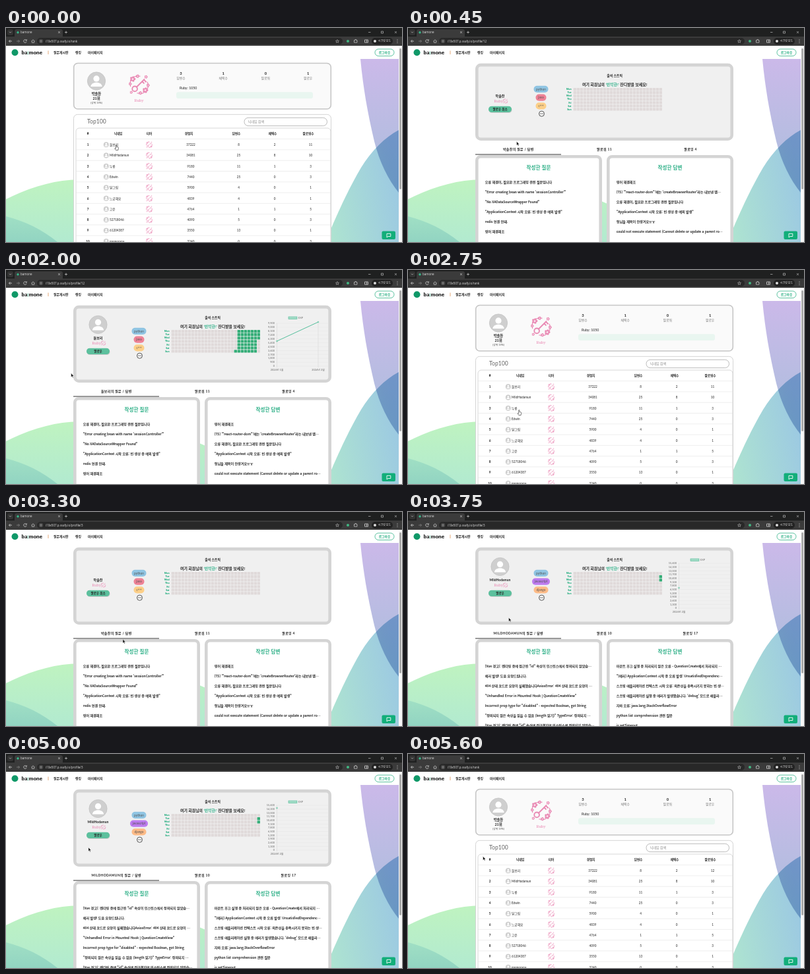
An HTML page that plays this animation: 600 by 325 pixels, repeating every 5.65 s.

```html
<!DOCTYPE html>
<html lang="ko">
<head>
<meta charset="utf-8">
<style>
html, body { margin: 0; width: 100%; height: 100%; overflow: hidden; background: #fff; }
svg { display: block; width: 100vw; height: 100vh; }
text { font-family: Lato, "Noto Sans CJK KR", "Noto Sans CJK", sans-serif; white-space: pre; }
.list text { font-family: "Noto Sans CJK KR", "Noto Sans CJK", sans-serif; }
.chrome text { font-family: "Open Sans", "Noto Sans CJK KR", "Noto Sans CJK", sans-serif; }
.serif { font-family: "Noto Serif", serif; }
text[font-weight="500"] { stroke: #222; stroke-width: .16; }
</style>
</head>
<body>
<svg id="stage" viewBox="0 0 600 325" xmlns="http://www.w3.org/2000/svg"></svg>
<script>
const LOOP = 5650;
const GREEN = '#16a878', PINK = '#e98ab4', INK = '#222';

const text = (x, y, s, size, { fill = INK, w = 400, a = 'middle', more = '' } = {}) =>
  `<text x="${x}" y="${y}" font-size="${size}" fill="${fill}" font-weight="${w}" text-anchor="${a}" ${more}>${s}</text>`;
const rect = (x, y, w, h, fill, r = 0, more = '') =>
  `<rect x="${x}" y="${y}" width="${w}" height="${h}" rx="${r}" fill="${fill}" ${more}/>`;
const circle = (x, y, r, fill, more = '') => `<circle cx="${x}" cy="${y}" r="${r}" fill="${fill}" ${more}/>`;
const line = (d, stroke, w = 1, more = '') => `<path d="${d}" fill="none" stroke="${stroke}" stroke-width="${w}" ${more}/>`;
const range = n => [...Array(n).keys()];
const badge = (x, y, size) => `<use href="#badge" x="${x - size / 2}" y="${y - size / 2}" width="${size}" height="${size}"/>`;
const avatar = (x, y, r) => `<g transform="translate(${x} ${y}) scale(${r / 14})">
  ${circle(0, 0, 13.6, '#cfcfcf', 'stroke="#c2c2c2" stroke-width=".8"')}
  ${circle(0, -3.6, 4.6, '#fff')}<path d="M-8.6 8.6C-8.6 0 8.6 0 8.6 8.6Z" fill="#fff"/></g>`;

function defs() {
  const flower = (x, y, r) => range(5).map(i => {
    const a = i * Math.PI * 0.4;
    return circle((x + r * Math.cos(a)).toFixed(1), (y + r * Math.sin(a)).toFixed(1), r * 0.66, PINK);
  }).join('') + circle(x, y, r * 0.5, '#fbe3ee');
  const grad = (id, from, to, dir) => `<linearGradient id="${id}" ${dir}>
    <stop stop-color="${from}"/><stop offset="1" stop-color="${to}"/></linearGradient>`;
  const down = 'x1="0" y1="0" x2="0" y2="1"';
  return `<defs>
    ${grad('leaf', '#bff3c0', '#b2ead0', down)}
    ${grad('sea', '#a0dfc4', '#92d4c2', down)}
    ${grad('violet', '#cbb9e9', '#a9bfdc', down)}
    ${grad('lagoon', '#aee4d0', '#9cc9e2', 'x1="0" y1=".8" x2="1" y2=".5"')}
    <symbol id="badge" viewBox="0 0 32 32">
      ${line('M4 19C1 9 9 2 18 4M28 12C32 23 23 31 13 28', PINK, 1.1)}
      ${line('M12 20L24 8M20.5 11.5L23.5 14.5M23 9L26.5 12.5', PINK, 1.8)}
      ${circle(10, 22, 3.6, 'none', `stroke="${PINK}" stroke-width="1.8"`)}
      ${flower(7, 8, 2.5)}${flower(25, 24, 2.5)}${flower(14, 4, 1.6)}${flower(18, 28, 1.6)}
      ${flower(3.5, 15, 1.4)}${flower(29, 17, 1.5)}${flower(26, 5, 1.5)}${flower(5, 27, 1.3)}
    </symbol></defs>`;
}

function browser() {
  const gray = '#d2d2d2';
  return `<g class="chrome">
    ${rect(0, 0, 600, 27, '#1f2020')}${rect(0, 13, 600, 14, '#3b3b3b')}
    ${rect(2, 2, 9, 9, '#333', 2.5)}${line('M5 5.7L6.5 7.2L8 5.7', gray, .7)}
    ${rect(13, 2, 73, 14, '#3b3b3b', 3)}${circle(18, 6.7, 1.7, '#35b88a')}
    ${text(22, 8.4, 'bamone', 4.5, { fill: '#e4e4e4', a: 'start' })}
    ${line('M79 5L82 8M82 5L79 8M89 6.5H93M91 4.5V8.5', gray, .7)}
    ${line('M549 6.5H552.5M568.5 5H571.5V8H568.5ZM589 5L592 8M592 5L589 8', gray, .6)}
    ${line('M9 20H4.5M6.5 18L4.5 20L6.5 22', gray, .8)}
    ${line('M16 20H20.5M18.5 18L20.5 20L18.5 22', '#858585', .8)}
    ${line('M31 18.8A2.3 2.3 0 1 0 31.2 20.6M31.3 17.3V19H29.5', gray, .8)}
    ${line('M38.5 20L41 17.8L43.5 20M39.3 19.5V22.2H42.7V19.5', gray, .7)}
    ${rect(47, 15, 463, 10, '#282828', 5)}${circle(53, 20, 3.4, '#3d3d3d')}
    ${line('M51.2 19H54.8M51.2 21H54.8', gray, .6)}
    ${text(60, 21.5, '', 4.5, { fill: '#e2e2e2', a: 'start', more: 'id="url"' })}
    ${line('M502 17.6L502.7 19.3L504.5 19.4L503.1 20.6L503.6 22.3L502 21.4L500.4 22.3L500.9 20.6L499.5 19.4L501.3 19.3Z', gray, .5)}
    ${circle(518, 20, 2, '#41b883')}
    ${line('M527.5 18.5H529V17.5H530.5V18.5H532V22H527.5Z', gray, .7)}
    ${line('M543.5 18H548.5V22H543.5ZM546.5 18V22', gray, .8)}
    ${rect(554, 15, 32, 10, '#222', 5)}${circle(559, 20, 2, '#ddd')}
    ${text(573.5, 21.4, '시크릿 모드', 4, { fill: '#eee' })}
    ${[17.8, 20, 22.2].map(y => circle(593, y, .55, gray)).join('')}
  </g>`;
}

function backdrop() {
  return rect(0, 27, 600, 298, '#fff') + `
    <path d="M0 260C40 240 75 231 110 230C190 229 255 246 300 266C350 288 390 310 420 325H0Z" fill="url(#leaf)"/>
    <path d="M0 286C28 293 55 306 78 325H0Z" fill="url(#sea)"/>
    <path d="M537 47H595V250C579 230 566 204 558 172C548 130 541 90 537 47Z" fill="url(#violet)"/>
    <path d="M484 325C500 286 518 246 538 212C554 186 574 166 595 155V325Z" fill="url(#lagoon)" style="mix-blend-mode:multiply"/>`;
}

function siteHeader() {
  const nav = (x, s) => text(x, 39, s, 4.9, { w: 700, a: 'start' });
  return rect(0, 27, 595, 20, '#fff') + circle(13.5, 37.3, 5, '#109868')
    + text(23.5, 40.2, `ba<tspan fill="${GREEN}">:</tspan>mone`, 8.1, { w: 900, a: 'start' })
    + line('M64 34.5V40', '#e2a06a', .9)
    + nav(72, '질문게시판') + nav(105, '랭킹') + nav(124, '마이페이지')
    + rect(559, 32, 29, 10.5, '#fff', 5.2, `stroke="${GREEN}" stroke-width=".7"`)
    + text(573.5, 39, '로그아웃', 4.8, { fill: GREEN, w: 700 });
}

function overlay() {
  return rect(595, 27, 5, 298, '#f7f7f7') + rect(596.2, 31, 2.8, 214, '#a5a5a5', 1.4)
    + rect(569.5, 308.5, 20.5, 12.5, '#12ae7a', 2)
    + line('M577 312.3H582.8V316.5H579L577 318Z', '#fff', .9);
}

const ranking = [
  ['들보리', 37222, 8, 2, 11], ['MildHodamun', 34081, 25, 8, 10], ['누룽', 9180, 11, 1, 3],
  ['Edwin', 7440, 25, 0, 3], ['달그림', 5900, 4, 0, 1], ['느긋해요', 4839, 4, 0, 1],
  ['고운', 4764, 1, 1, 5], ['52718046', 4090, 5, 0, 3], ['61204387', 3550, 13, 0, 1], ['momoruna', 3240, 0, 0, 3],
];

function rankPage() {
  const stats = [['답변수', 3], ['채택수', 1], ['팔로워', 0], ['팔로우', 1]].map(([label, n], i) => {
    const x = 265 + i * 64.2;
    return text(x, 71, n, 5.8, { w: 700 }) + text(x, 78, label, 4.8, { fill: '#777' });
  }).join('');
  const heads = [[124, '#'], [170, '닉네임'], [217, '티어'], [277, '경험치'], [349, '답변수'], [404, '채택수'], [458, '팔로워수']]
    .map(([x, s]) => text(x, 162, s, 4.6, { w: 500 })).join('');
  const rows = ranking.map(([name, exp, answers, picks, fans], i) => {
    const y = 177.2 + i * 16.3, cell = (x, s, more) => text(x, y + 1.8, s, 4.7, { more });
    return line(`M106 ${y - 8.6}H492`, '#e2e2e2', .6) + text(124, y + 1.8, i + 1, 4.7, { w: 700 })
      + avatar(151.8, y, 4) + text(157, y + 1.8, name, 4.7, { a: 'start' }) + badge(217, y, 11)
      + cell(280, exp) + cell(352.5, answers) + cell(407, picks) + cell(461.5, fans, i ? '' : 'id="topFans"');
  }).join('');
  return `<g id="rank">
    ${rect(102.7, 53.5, 389.6, 69.5, '#fafafa', 6, 'stroke="#c6c6c6" stroke-width="1.6"')}
    ${avatar(137, 80.5, 14)}${text(137, 102.2, '박솔찬', 5.2, { w: 700 })}
    ${text(137, 109.2, '21위', 5.4, { w: 700 })}${text(137, 115, '(상위 19%)', 3.8, { fill: '#444' })}
    ${badge(201.5, 86, 34)}${text(201.5, 112, 'Ruby', 5.8, { fill: PINK, more: 'class="serif"' })}
    ${stats}${text(263, 93, 'Ruby: 1050', 5.2, { a: 'start' })}${rect(258, 97.3, 207, 9.7, '#e9f6f0', 3)}
    ${rect(102.5, 131.3, 390, 210, '#fff', 6, 'stroke="#d4d4d4" stroke-width="1"')}
    ${text(123, 145.3, 'Top100', 8.6, { fill: '#666', a: 'start' })}
    ${rect(361, 136.3, 125.5, 12.3, '#fff', 6, 'stroke="#aaa" stroke-width=".8"')}
    ${text(366.5, 144, '닉네임 검색', 5.1, { fill: '#888', a: 'start' })}
    ${rect(106, 152, 386, 190, '#fff', 5, 'stroke="#d4d4d4" stroke-width=".9"')}
    ${heads}${rows}</g>`;
}

const bug = '"ApplicationContext 시작 오류: 빈 생성 중 예외 발생"';
const ask = '오류 해결이, 필요한 프로그래밍 관련 질문입니다';
const bean = {
  name: '들보리', fans: 11, follows: 4, button: '팔로우', loaded: true,
  tags: [['python', '#8fc4e2', 22], ['java', '#ee8296', 16], ['c++', '#fccf88', 16]],
  grass: (c, r) => r < 3 ? c > 19 : r < 6 ? c > 19 && c < 26 : c > 18 && c < 26,
  step: 900, ticks: 11, top: 81, points: [108, 79],
  questions: [ask, `"Error creating bean with name 'sessionController'"`, '"No XADataSourceWrapper Found"', bug, 'redis 연결 안돼.', '영어 해결해조'],
  answers: ['영어 해결해조', `[TS] '"react-router-dom"'에는 'createBrowserRouter'라는 내보낸 멤…`, ask, bug, '형님들 제목이 안생겨요ㅠㅠ', 'could not execute statement [Cannot delete or update a parent ro…'],
};
const blank = { ...bean, name: '박솔찬', button: '팔로우 취소', loaded: false, grass: () => false };
const second = {
  name: 'MildHodamun', fans: 10, follows: 17, button: '팔로우', loaded: true,
  tags: [['python', '#8fc4e2', 22], ['javascript', '#bd7bef', 27], ['django', '#fdbb87', 22]],
  grass: (c, r) => c === 26 && (r === 1 || r === 2),
  step: 1300, ticks: 12, top: 78, points: [82],
  questions: ['[Vue 경고]: 렌더링 중에 접근된 "id" 속성이 인스턴스에서 정의되지 않았습…', '에러 발생! 도움 요청드립니다.',
    '404 상태 코드로 요청이 실패했습니다AxiosError: 404 상태 코드로 요청이 …', '"Unhandled Error in Mounted Hook | QuestionCreateView"',
    'Incorrect prop type for "disabled" - expected Boolean, got String', `"정의되지 않은 속성을 읽을 수 없음 (length 읽기)" TypeError: 정의되지 …`,
    '[Vue 경고]: 렌더링 중에 "id" 속성에 접근했지만 인스턴스에 정의되지 않았습…'],
  answers: ['마운트 후크 실행 중 처리되지 않은 오류 - QuestionCreate에서 처리되지 …', `"[에러] ApplicationContext 시작 중 오류 발생: UnsatisfiedDependenc…`,
    '스프링 애플리케이션 컨텍스트 시작 오류: 의존성을 충족시키지 못하는 빈 생…', `스프링 애플리케이션 실행 중 에러가 발생했습니다. 'debug' 모드로 애플리…`,
    '자바 오류: java.lang.StackOverflowError', 'python list comprehension 관련 질문', 'js setTimeout'],
};

function chart(user) {
  const gap = (146 - user.top) / user.ticks, xs = [410.5, 473];
  const ticks = range(user.ticks + 1).map(i => {
    const y = 146 - i * gap;
    return line(`M409 ${y}H488`, '#e0e0e0', .4)
      + text(407, y + 1.3, (i * user.step).toLocaleString('en-US'), 3.9, { fill: '#666', a: 'end' });
  }).join('');
  const labels = user.points.length > 1 ? ['2024년 1월', '2024년 2월'] : ['2024년 2월'];
  return rect(428, 71, 13, 3.6, '#a5ddc8', 0, 'stroke="#4fba96" stroke-width=".6"')
    + text(443, 74.3, 'EXP', 3.9, { fill: '#666', a: 'start' })
    + ticks + labels.map((s, i) => line(`M${xs[i]} ${user.top}V148`, '#d4d4d4', .5)
      + text(xs[i], 153.3, s, 3.9, { fill: '#666' })).join('') + '<g class="curve"></g>';
}

function profilePage(user, id) {
  const days = ['Mon', 'Tue', 'Wed', 'Thu', 'Fri', 'Sat', 'Sun'];
  const cells = days.map((d, r) => text(247.5, 94.3 + r * 5.05, d, 3.7, { fill: GREEN, w: 900, a: 'end' })
    + range(27).map(c => rect(250.6 + c * 5, 91.1 + r * 5.02, 4.4, 4.4, user.grass(c, r) ? '#35ad78' : '#e0dada', .5)).join('')).join('');
  const tags = user.tags.map(([s, fill, w], i) => rect(201.5 - w / 2, 87.8 + i * 12.7, w, 10.2, fill, 5)
    + text(201.5, 94.5 + i * 12.7, s, 4.8, { fill: '#555' })).join('');
  const tab = (x, s) => text(x, 186.3, s, 4.9, { w: 700, more: 'letter-spacing=".4"' });
  const panel = (x, title, items) => rect(x + 2.3, 195.2, 187.4, 150, '#fff', 6, 'stroke="#d4d4d4" stroke-width="4.6"')
    + text(x + 96, 214.7, title, 7.6, { fill: '#2fb088', w: 700 })
    + items.map((s, i) => text(x + 14.8, 236 + i * 14.97, s, 5.05, { a: 'start', w: 500 })).join('');
  return `<g id="${id}">
    ${rect(104.3, 56.1, 386.4, 112.6, '#f0f0f0', 6, 'stroke="#d4d4d4" stroke-width="4.6"')}
    ${user.loaded ? avatar(139.5, 83, 14) : ''}
    ${text(139.5, 105, user.name, 5, { w: 700 })}
    ${text(137, 113, 'Ruby', 5.6, { fill: PINK, more: 'class="serif"' })}${badge(147.5, 111, 8)}
    ${rect(122.5, 119.6, 35, 9.4, '#000', 4.6, 'opacity=".15"')}${rect(122, 118.7, 35, 9.4, '#5cc09d', 4.6)}
    ${text(139.5, 125.1, user.button, 4.6, { w: 700 })}
    ${tags}${circle(202.5, 130.2, 4, '#fff', 'stroke="#222" stroke-width=".8"')}
    ${[200.6, 202.5, 204.4].map(x => circle(x, 130.2, .6, INK)).join('')}
    ${text(313.2, 73.5, '출석 스트릭', 4.9, { w: 700 })}
    ${text(313.2, 88.2, `여기 회원님의 <tspan fill="#2fb088">'빈약한!'</tspan> 잔디밭을 보세요!`, 5.9, { w: 700 })}
    ${cells}${user.loaded ? chart(user) : ''}
    ${tab(167.3, user.name.toUpperCase() + '의 질문 / 답변')}${tab(297.5, '팔로워 ' + user.fans)}${tab(428, '팔로잉 ' + user.follows)}
    <g class="list">${panel(102, '작성한 질문', user.questions)}${panel(301, '작성한 답변', user.answers)}</g>
    ${line('M102 192H232', '#333', 1)}</g>`;
}

// Pointer shapes have their hot spot at 0,0.
const pointers = `<g id="arrow"><path d="M0 0V5.8L1.4 4.6L2.4 6.8L3.3 6.4L2.3 4.3H4.1Z" fill="#111" stroke="#fff" stroke-width=".4"/></g>
  <g id="hand"><path d="M-.6 .4Q0 -.5 .7 .4V3L2.8 3.5Q3.5 3.7 3.4 4.7L2.8 8H-.5L-2.3 5.4Q-2.2 4.4 -.6 5.3Z" fill="#fff" stroke="#222" stroke-width=".6"/></g>`;

const stage = document.getElementById('stage');
const users = { bean, blank, second };
stage.innerHTML = defs() + backdrop() + siteHeader() + rankPage()
  + Object.entries(users).map(([id, user]) => profilePage(user, id)).join('') + overlay() + browser() + pointers;
const $ = id => document.getElementById(id);

// [start, page, address]
const scenes = [
  [0, 'rank', 'rank'], [350, 'blank', 'profile/12'], [790, 'bean', 'profile/12'], [2300, 'rank', 'rank'],
  [3100, 'blank', 'profile/3'], [3600, 'second', 'profile/3'], [5100, 'rank', 'rank'],
];
// [time, x, y, hand?]
const path = [
  [0, 167, 177.5, 1], [350, 167, 178, 0], [850, 144.3, 124.5, 1], [1250, 144.3, 124.5, 0], [1950, 97.8, 156, 0],
  [2300, 112, 170, 0], [2550, 168.3, 212.5, 1], [2780, 168.3, 212.5, 1], [3020, 171, 191, 1], [3100, 172, 191, 0],
  [3300, 177, 193.3, 0], [4150, 132.3, 133, 0], [4700, 132.3, 133, 0], [5400, 113.6, 155.5, 0], [LOOP, 113.6, 155.5, 0],
];
const latest = (list, t) => list.findLastIndex(item => item[0] <= t);

function drawCurve(user, id, elapsed) {
  const grow = 1 - (1 - Math.min(elapsed / 1000, 1)) ** 4;
  const dots = user.points.map((y, i) => [410.5 + i * 62.5, 146 - (146 - y) * grow]);
  $(id).querySelector('.curve').innerHTML = line('M' + dots.map(p => p.join(' ')).join('L'), '#55bf9c', 1)
    + dots.map(([x, y]) => circle(x, y, 1, '#8fd6bd', 'stroke="#4fba96" stroke-width=".4"')).join('');
}

function render(t) {
  const [start, page, address] = scenes[latest(scenes, t)];
  for (const id of ['rank', ...Object.keys(users)]) $(id).style.display = id === page ? '' : 'none';
  $('url').textContent = 'i10e507.p.ssafy.io/' + address;
  $('topFans').textContent = t >= 5100 ? 12 : 11;
  if (users[page]?.loaded) drawCurve(users[page], page, t - start);

  const i = latest(path, t), from = path[i], to = path[i + 1] || from;
  const u = (t - from[0]) / (to[0] - from[0] || 1), ease = u * u * (3 - 2 * u);
  const at = k => from[k] + (to[k] - from[k]) * ease;
  for (const id of ['arrow', 'hand']) {
    $(id).style.display = (id === 'hand') === !!from[3] ? '' : 'none';
    $(id).setAttribute('transform', `translate(${at(1)} ${at(2)})`);
  }
}

const began = performance.now();
function tick() {
  render((performance.now() - began) % LOOP);
  requestAnimationFrame(tick);
}
tick();
</script>
</body>
</html>
```
